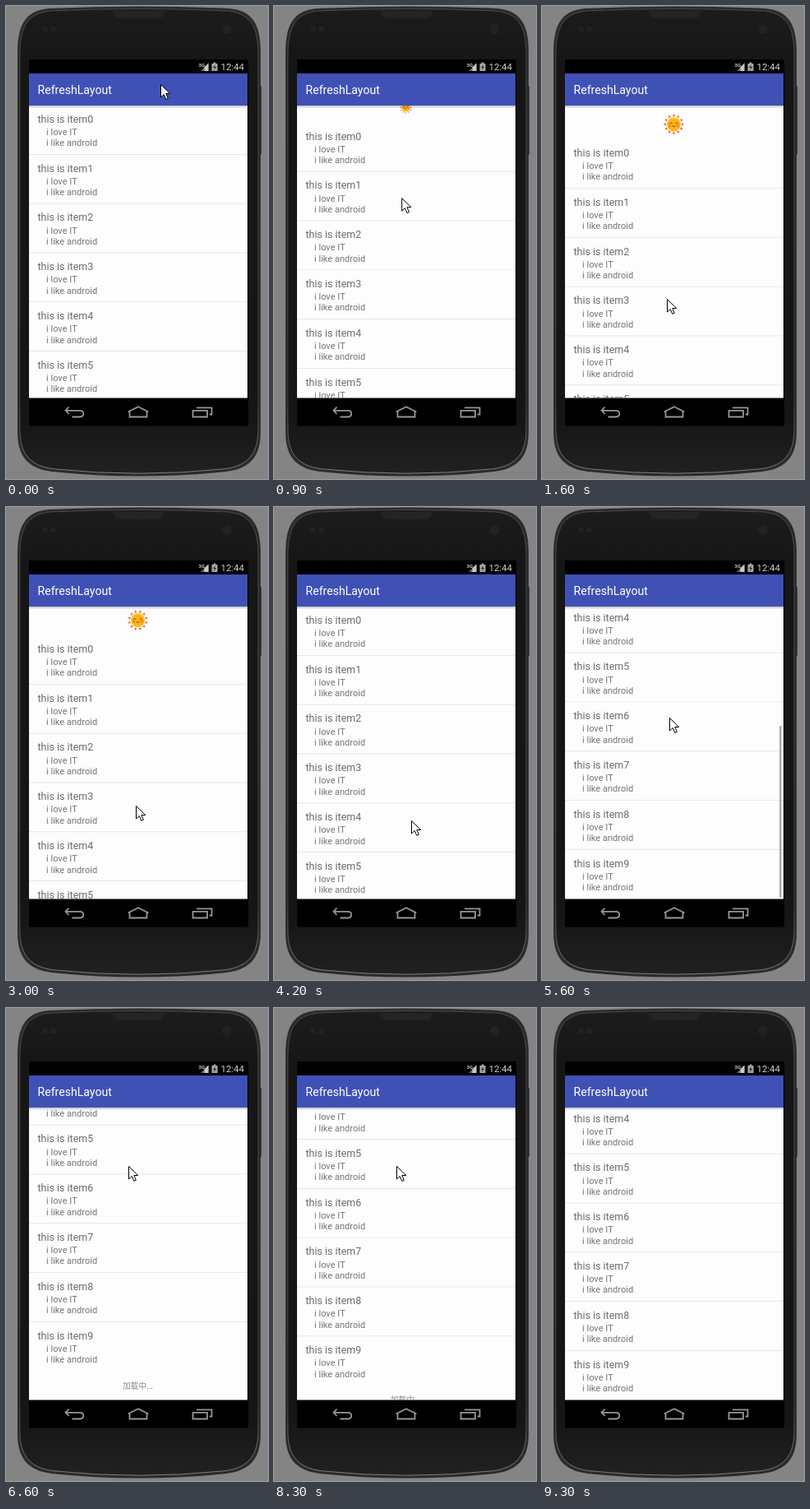
An HTML page that plays this animation: 319x575 px, repeating every 9700 ms.

```html
<!DOCTYPE html>
<html lang="en">
<head>
<meta charset="utf-8">
<title>RefreshLayout</title>
<style>
  html, body { margin: 0; width: 100%; height: 100%; overflow: hidden; background: #848484; }
  svg { display: block; width: 100%; height: 100%; }
  text { font-family: Roboto, "Noto Sans", sans-serif; }
  .title { font-size: 14.1px; fill: #fff; }
  .clock { font-size: 11.4px; fill: #cfcfcf; }
  .item { font-size: 12.47px; fill: #6b6b6b; }
  .sub { font-size: 11.08px; fill: #757575; }
  .footer { font: 9.7px "Noto Sans CJK SC", "Noto Sans CJK", sans-serif; fill: #8a8a8a; text-anchor: middle; }
  .nav { fill: none; stroke: #969696; stroke-width: 1.8; }
</style>
</head>
<body>
<svg viewBox="0 0 319 575">
  <defs>
    <linearGradient id="shell" x2="0" y2="1">
      <stop offset="0" stop-color="#1c1c1c"/>
      <stop offset=".12" stop-color="#161616"/>
      <stop offset=".88" stop-color="#161616"/>
      <stop offset="1" stop-color="#212121"/>
    </linearGradient>
    <linearGradient id="rim" x2="0" y2="1">
      <stop offset="0" stop-color="#4a4a4a"/>
      <stop offset=".85" stop-color="#3c3c3c"/>
      <stop offset="1" stop-color="#808080"/>
    </linearGradient>
    <linearGradient id="shade" x2="0" y2="1">
      <stop offset="0" stop-opacity=".24"/>
      <stop offset="1" stop-opacity="0"/>
    </linearGradient>
    <clipPath id="listArea"><rect x="28" y="121" width="266" height="355.5"/></clipPath>
    <path id="body" d="M14 58C14 24 22 6 52 3Q161 -2 272 3C302 6 310 24 310 58V517C310 545 300 562 268 566Q161 577 56 566C24 562 14 545 14 517Z"/>
  </defs>

  <!-- phone -->
  <rect x="308" y="97" width="3" height="84" rx="1" fill="#333"/>
  <use href="#body" fill="#2b2b2b"/>
  <use href="#body" fill="url(#shell)" stroke="url(#rim)" transform="translate(3.200 3) scale(.98 .989)"/>
  <path d="M129 6H194L190 13Q188 15 185 15H138Q135 15 133 13Z" fill="#242424"/>
  <g fill="#222">
    <circle cx="47.500" cy="28" r="3.500"/><circle cx="57.500" cy="28" r="3.500"/>
    <circle cx="269" cy="28" r="6"/>
  </g>

  <!-- screen -->
  <rect x="28" y="65" width="267" height="445.500"/>
  <rect x="28" y="121" width="266" height="355.500" fill="#fdfdfd"/>
  <g clip-path="url(#listArea)">
    <g id="list"></g>
    <text id="footer" class="footer" x="160.500">加载中...</text>
    <g id="sun">
      <g id="rays" fill="#ef5b3c"></g>
      <circle r="8.600" fill="#ffc21a"/>
      <circle r="7.200" cy=".6" fill="#fdb515"/>
      <path d="M-5 -1.200q1.300 -1.600 2.600 0M2.400 -1.200q1.300 -1.600 2.600 0M-1.500 2.200q1.500 1.500 3 0" fill="none" stroke="#7a3f16" stroke-linecap="round"/>
      <g fill="#f4774a"><circle cx="-5" cy="1.600" r="1.500"/><circle cx="5" cy="1.600" r="1.500"/></g>
    </g>
    <rect id="scrollbar" x="289.200" width="2.200" fill="#a2a2a2"/>
  </g>
  <rect x="28" y="121" width="266" height="3.500" fill="url(#shade)"/>
  <rect x="28" y="82" width="266" height="39" fill="#3f51b5"/>
  <text class="title" x="38.500" y="107">RefreshLayout</text>

  <!-- status bar -->
  <text x="234.500" y="73.500" font-size="6" font-weight="700" fill="#ccc">3G</text>
  <path d="M237 79L246.500 69.500V79Z" fill="#666"/>
  <path d="M241.500 79V74.500L246.500 69.500V79Z" fill="#c8c8c8"/>
  <path d="M252.700 68.500H255.300V70H257.500V79H250.500V70H252.700Z" fill="#a8a8a8"/>
  <path d="M255 71L252 75H254L253 78.500L256 74H254.200Z" fill="#222"/>
  <text class="clock" x="261.500" y="78">12:44</text>

  <!-- navigation bar -->
  <g class="nav">
    <path d="M76.500 487.500L72.500 491.800L76.500 496M72.500 491.800H90Q94.200 491.800 94.200 495.500T90 499.500H80.500"/>
    <path d="M148.800 493.200L161 487.300L173.200 493.200H171.500V499.500H150.500V493.200Z"/>
    <path d="M227.500 491.800H245V499.500H227.500ZM232 488.300H250.500V496.500H247.800"/>
  </g>

  <path id="cursor" d="M.5 .5V16L4.200 12.500L6.800 18.400L9.300 17.300L6.800 11.500H11.800Z" fill="#fff" stroke="#000"/>
</svg>
<script>
const LOOP = 9700, TICK = 100;
const TOP = 121, VIEW = 355, ROW = 59.8, ROWS = 10;
const THUMB = VIEW / (ROW * ROWS);
const MAX_SCROLL = ROW * ROWS - VIEW - 0.5;
const PANEL = 35; // height of the refresh header and of the loading footer
const CURSOR_START = [188, 95];

// Pointer strokes: start and end time, then where the tip arrives.
const strokes = [
  [0, 400, 157, 163], [500, 1600, 152, 356], [2500, 2600, 158, 363],
  [3600, 4200, 167, 381], [4200, 4700, 168, 461], [4700, 5600, 155, 256],
  [5600, 6000, 170, 356], [6000, 6600, 149, 192], [9000, 9200, 281, 178]
];

const $ = id => document.getElementById(id);
const ramp = (t, from, to) => Math.min(1, Math.max(0, (t - from) / (to - from)));
const easeOut = k => Math.sin(k * Math.PI / 2);
const easeInOut = k => (1 - Math.cos(k * Math.PI)) / 2;

// A panel is dragged past its height, settles on it and later closes.
function panel(t, { drag, settle, close, over }) {
  return (PANEL + over) * easeOut(ramp(t, ...drag))
    - over * easeOut(ramp(t, ...settle))
    - PANEL * easeInOut(ramp(t, ...close));
}

const header = { drag: [500, 1700], settle: [1800, 2400], close: [3600, 4000], over: 6.5 };
const loader = { drag: [6000, 6400], settle: [6400, 6600], close: [8100, 8500], over: 4 };

function pointer(t) {
  return strokes.reduce(([x, y], [from, to, toX, toY]) => {
    const k = ramp(t, from, to);
    return [x + (toX - x) * k, y + (toY - y) * k];
  }, CURSOR_START);
}

const label = (cls, x, y, s) => `<text class="${cls}" x="${x}" y="${y}">${s}</text>`;

$('list').innerHTML = Array.from({ length: ROWS }, (_, i) => {
  const y = TOP + i * ROW;
  const divider = i < ROWS - 1
    ? `<rect x="28" y="${y + ROW - 0.8}" width="266" height=".8" fill="#e2e2e2"/>` : '';
  return label('item', 38.5, y + 20.8, 'this is item' + i) +
    label('sub', 49, y + 36, 'i love IT') +
    label('sub', 49, y + 49.3, 'i like android') + divider;
}).join('');

$('rays').innerHTML = Array.from({ length: 12 }, (_, i) =>
  `<path d="M-1.6 -9.600H1.600L0 -12.800Z" transform="rotate(${i * 30})"/>`).join('');

function move(id, x, y, extra = '') {
  $(id).setAttribute('transform', `translate(${x} ${y}) ${extra}`);
}

function show(id, visible) {
  $(id).style.display = visible ? '' : 'none';
}

function draw(t) {
  const pull = panel(t, header);
  const more = panel(t, loader);
  const scroll = MAX_SCROLL * easeInOut(ramp(t, 4600, 5600));

  move('list', 0, pull - scroll - more);
  move('sun', 160.5, 102.7 + pull, `scale(${Math.min(1, pull / PANEL)})`);
  move('rays', 0, 0, `rotate(${15 * Math.floor(18 * ramp(t, 0, 3600) / 2 * 2)})`);
  show('sun', pull > 0.1);

  $('footer').setAttribute('y', TOP + VIEW + 21.5 - more);
  show('footer', more > 0.1);

  $('scrollbar').setAttribute('y', TOP + 1 + scroll * THUMB);
  $('scrollbar').setAttribute('height', VIEW * THUMB - 2);
  $('scrollbar').style.opacity = ramp(t, 4600, 4700) - ramp(t, 5700, 6100);

  move('cursor', ...pointer(t));
  show('cursor', t < 9300);
}

const start = performance.now();
function frame() {
  const t = (performance.now() - start) % LOOP;
  draw(Math.floor(t / TICK) * TICK);
  requestAnimationFrame(frame);
}
frame();
</script>
</body>
</html>
```
